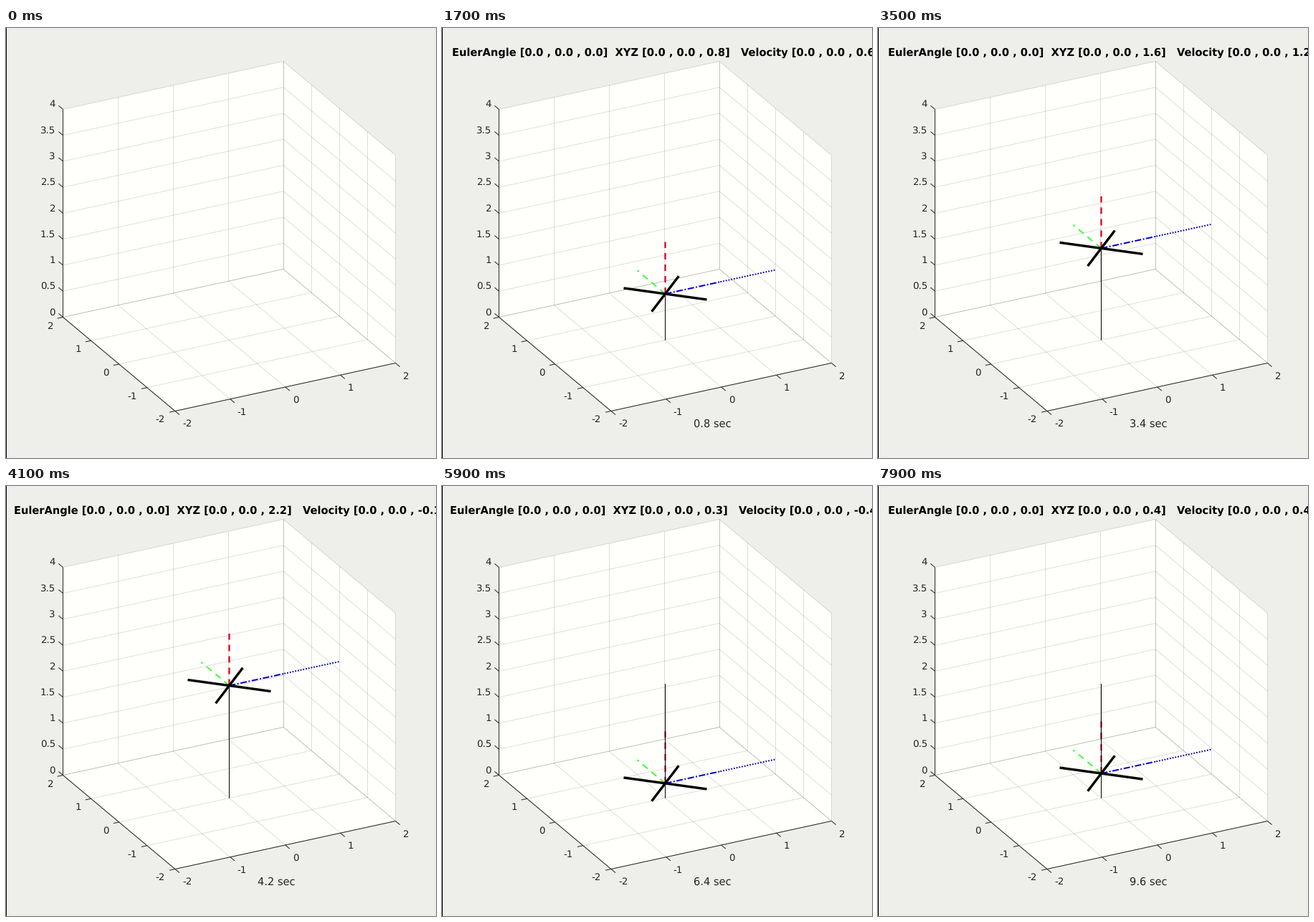
These frames come from a looping animation (600x600 px, 8000 ms). A matplotlib script:

```python
import matplotlib.pyplot as plt
import numpy as np
from matplotlib.animation import FuncAnimation

SIZE, DPI = 600, 100
BACK, PANE, INK = "#eeefea", "#fffffb", "#262626"
plt.rcParams.update({"font.family": "DejaVu Sans", "text.hinting": "none",
                     "path.snap": False})

# Screen vectors of the three axes, in pixels per unit
ORIGIN = np.array([311.5, 435.5])
EX = np.array([76.9, -16.75])
EY = np.array([-39.1, -32.75])
EZ = np.array([0.0, -72.5])

START = 9    # frame in which the craft appears
LAG = 0.12   # delay of the readout, in seconds

# Pace of the simulation: steps of 0.2 s reached at these frames
PACE = [(9.9, 0), (16.9, 4), (27.8, 12), (40.1, 21), (58.2, 32), (78.1, 48)]

# Take-off settles at a hover; then key points of time, height, climb rate
HOVER, TAKEOFF, RATE = 1.1, 0.047, 2.2
KEYS = [(2.6, HOVER, 0), (4.0, 2.2, 0), (6.35, 0.297, -0.3), (6.65, 0.26, 0),
        (7.85, 0.51, 0), (8.08, 0.325, -1.8), (8.26, 0.06, 0),
        (9.6, 0.475, 0.4)]


def flight(t):
    """Height and climb rate at time t."""
    if t < KEYS[0][0]:
        gap = HOVER * np.exp(-RATE * max(t - TAKEOFF, 0))
        return HOVER - gap, RATE * gap
    i = max(j for j, key in enumerate(KEYS[:-1]) if key[0] <= t)
    (t0, z0, v0), (t1, z1, v1) = KEYS[i:i + 2]
    h, d = t1 - t0, z1 - z0
    s = (t - t0) / h
    a, b = v0 * h, v1 * h
    c2, c3 = 3 * d - 2 * a - b, a + b - 2 * d
    return z0 + s * (a + s * (c2 + s * c3)), (a + s * (2 * c2 + 3 * s * c3)) / h


def project(x, y, z):
    return ORIGIN + x * EX + y * EY + z * EZ


def pt(px):
    return px * 72 / DPI


fig = plt.figure(figsize=(SIZE / DPI, SIZE / DPI), dpi=DPI, facecolor=BACK)
ax = fig.add_axes([0, 0, 1, 1])
ax.set(xlim=(0, SIZE), ylim=(SIZE, 0))
ax.axis("off")


def line(p, q, color, width=1.0, dash=None, **kw):
    xs = np.array([p[0], q[0]])
    if abs(xs[0] - xs[1]) < 1e-6:  # keep upright lines on whole pixels
        xs = np.floor(xs + 1e-6) + 0.5
    art, = ax.plot(xs, [p[1], q[1]], color=color, lw=pt(width),
                   solid_capstyle="butt", dash_capstyle="butt", **kw)
    if dash:
        art.set_linestyle((0, [d / pt(width) * pt(1) for d in dash]))
    return art


def label(x, y, text, px=13.33, color=INK, **kw):
    return ax.text(x, y, text, fontsize=pt(px), color=color,
                   va="baseline", **kw)


def draw_box():
    panes = [[(-2, -2, 0), (2, -2, 0), (2, 2, 0), (-2, 2, 0)],
             [(-2, 2, 0), (2, 2, 0), (2, 2, 4), (-2, 2, 4)],
             [(2, -2, 0), (2, 2, 0), (2, 2, 4), (2, -2, 4)]]
    for pane in panes:
        ax.fill(*np.array([project(*c) for c in pane]).T, color=PANE, lw=0)

    def grid(p, q):
        line(project(*p), project(*q), INK, alpha=0.15)

    for k in range(-2, 3):
        grid((k, -2, 0), (k, 2, 0))
        grid((k, 2, 0), (k, 2, 4))
        grid((-2, k, 0), (2, k, 0))
        grid((2, k, 0), (2, k, 4))
    for z in np.arange(0, 4.5, 0.5):
        grid((-2, 2, z), (2, 2, z))
        grid((2, -2, z), (2, 2, z))

    corner = project(-2, -2, 0)
    for end in (project(2, -2, 0), project(-2, 2, 0)):
        line(corner, end, INK)
    line(project(-2, 2, 0), project(-2, 2, 4), INK)

    along_x = 8 * EX / np.hypot(*EX)
    along_y = 8 * EY / np.hypot(*EY)
    for k in range(-2, 3):
        p = project(k, -2, 0)
        line(p, p - along_y, INK)
        label(p[0] + 10, p[1] + 22, str(k), ha="left")
        p = project(-2, k, 0)
        line(p, p - along_x, INK)
        label(p[0] - 14, p[1] + 16, str(k), ha="right")
    for z in np.arange(0, 4.5, 0.5):
        p = project(-2, 2, z)
        line(p, p + along_y, INK)
        label(p[0] - 10.5, p[1] - 3, f"{z:g}", ha="right")


draw_box()
line((0, 0), (0, SIZE), "black")

HUB = np.zeros(2)
DIAG, CROSS = (EX + EY) / 2, (EX - EY) / 2
PARTS = [  # start, end, colour, width, dash
    (EX, 2 * EX, "#0000b4", 2.0, (1.8, 2.0)),
    (HUB, EX, "#0000c8", 2.0, (9, 2.5, 2, 2.5)),
    (HUB, EY, "#3cff3c", 2.0, (9, 7)),
    (HUB, EZ, "#d8001a", 2.2, (9, 7)),
    (-CROSS, CROSS, "black", 3.4, None),
    (-DIAG, DIAG, "black", 3.4, None),
]
craft = [line(p, q, c, w, d, zorder=5) for p, q, c, w, d in PARTS]
trail = line(ORIGIN, ORIGIN, "black", zorder=6)
title = label(312.5, 39, "", 14.67, "black", ha="center", weight="bold")
clock = label(377.7, 557, "", 14.67, ha="center")


def update(k):
    n = int(np.interp(k, *zip(*PACE)))
    for art in craft + [trail]:
        art.set_visible(k >= START)
    for art in (title, clock):
        art.set_visible(n > 0)
    t = n / 5
    center = project(0, 0, flight(t)[0])
    for art, (p, q, *_) in zip(craft, PARTS):
        art.set_data(*np.array([center + p, center + q]).T)
    top = max(flight(i / 10)[0] for i in range(2 * n + 1))
    trail.set_data(*np.array([ORIGIN, project(0, 0, top)]).T)
    z, v = flight(t - LAG)
    title.set_text(f"EulerAngle [0.0 , 0.0 , 0.0]  XYZ [0.0 , 0.0 , {z:.1f}]"
                   f"   Velocity [0.0 , 0.0 , {v:.1f}]")
    clock.set_text(f"{t:.1f} sec")


anim = FuncAnimation(fig, update, frames=80, interval=100,
                     init_func=lambda: update(0), repeat=True, repeat_delay=0)
plt.show()
```
